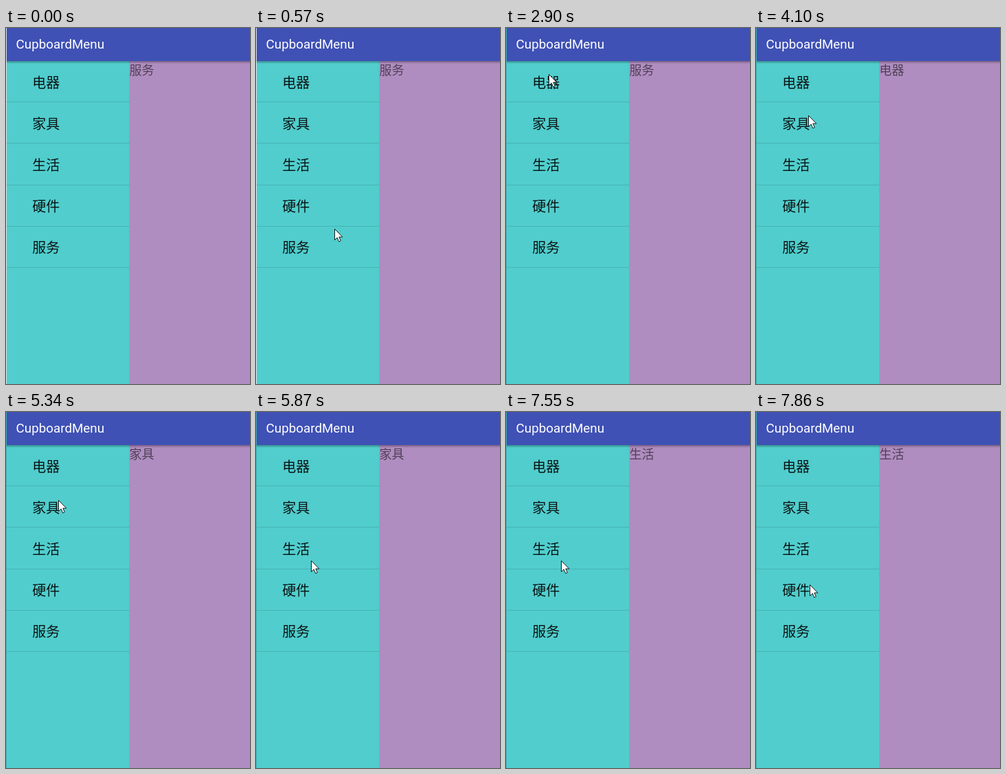
These frames come from a looping animation (355 px wide and 518 px high, 8000 ms). An HTML page:

```html
<!DOCTYPE html>
<html lang="zh-CN">
<head>
<meta charset="utf-8">
<title>CupboardMenu</title>
<style>
  html, body { margin: 0; width: 100%; height: 100%; overflow: hidden; }
  svg { display: block; }
  text { font-family: "Noto Sans CJK SC", "Noto Sans CJK", sans-serif; }
  .title { font: 400 18.8px Roboto, sans-serif; fill: #fff; }
  .list { font-size: 20px; fill: #0b1414; }
  .detail { font-size: 18px; fill: #000; fill-opacity: .55; }
  .lines { stroke: #000; stroke-opacity: .12; }

  .edge, .press, .strip, .cursor { animation: 8s step-end infinite; }
  .edge { animation-name: edge; }
  .press { animation-name: press; }
  .strip { animation-name: strip; }
  .cursor { animation-name: cursor; }

  @keyframes edge {
    0% { fill: #dfe3e8; }
    36.25%, 100% { fill: #42a8ac; }
  }
  @keyframes press {
    0% { opacity: 0; }
    93.375% { opacity: 1; }
    94.375%, 100% { opacity: 0; }
  }
  @keyframes strip {
    0% { transform: translateY(0); }
    41.875% { transform: translateY(-40px); }
    66.75% { transform: translateY(-80px); }
    94.375%, 100% { transform: translateY(-120px); }
  }
  @keyframes cursor {
    0% { transform: translate(174px, 382px); opacity: 0; }
    6.125% { transform: translate(174px, 382px); opacity: 1; }
    7.125% { transform: translate(114px, 292px); }
    17.125% { transform: translate(82px, 221px); }
    18% { transform: translate(40px, 128px); }
    19% { transform: translate(21px, 85px); }
    24.75% { transform: translate(32px, 81px); }
    25.75% { transform: translate(50px, 73px); }
    26.75% { transform: translate(62px, 67px); }
    47.375% { transform: translate(64px, 74px); }
    48.375% { transform: translate(68px, 90px); }
    49.375% { transform: translate(72px, 108px); }
    50.25% { transform: translate(75px, 121px); }
    51.25% { transform: translate(76px, 127px); }
    61% { transform: translate(76px, 128px); }
    69.5% { transform: translate(77px, 143px); }
    70.5% { transform: translate(79px, 175px); }
    71.5% { transform: translate(81px, 209px); }
    72.375% { transform: translate(81px, 223px); }
    73.375% { transform: translate(80px, 216px); }
    95.375% { transform: translate(80px, 222px); }
    96.25% { transform: translate(79px, 234px); }
    97.25% { transform: translate(78px, 246px); }
    98.25%, 100% { transform: translate(78px, 251px); opacity: 1; }
  }
</style>
</head>
<body>
<svg width="355" height="518" viewBox="0 0 355 518">
  <defs>
    <linearGradient id="shade" x2="0" y2="1">
      <stop stop-opacity=".34"/>
      <stop offset="1" stop-opacity="0"/>
    </linearGradient>
  </defs>

  <rect width="179" height="518" fill="#51cdcd"/>
  <rect x="179" width="176" height="518" fill="#b08dc0"/>
  <rect class="press" x="1" y="167" width="178" height="61" fill="#41bcde"/>
  <path class="lines" d="M1 107.5h178M1 167.5h178M1 228.5h178M1 288.5h178M1 348.5h178"/>

  <g class="list">
    <text x="38.3" y="87">电器</text>
    <text x="38.3" y="147">家具</text>
    <text x="38.3" y="207">生活</text>
    <text x="38.3" y="267">硬件</text>
    <text x="38.3" y="327">服务</text>
  </g>

  <svg x="179" y="50" width="60" height="24">
    <g class="detail strip">
      <text x=".4" y="18">服务</text>
      <text x=".4" y="58">电器</text>
      <text x=".4" y="98">家具</text>
      <text x=".4" y="138">生活</text>
    </g>
  </svg>

  <rect width="355" height="48" fill="#3f51b5"/>
  <rect y="48" width="355" height="4" fill="url(#shade)"/>
  <text class="title" x="14.6" y="29.5">CupboardMenu</text>
  <rect class="edge" width="1" height="518"/>

  <path class="cursor" d="M.5.5v16l3.7-3.5 2.5 5.8 2.6-1.1-2.5-5.6h5z"
        fill="#fff" stroke="#15191c" stroke-linejoin="round"/>
</svg>
</body>
</html>
```
